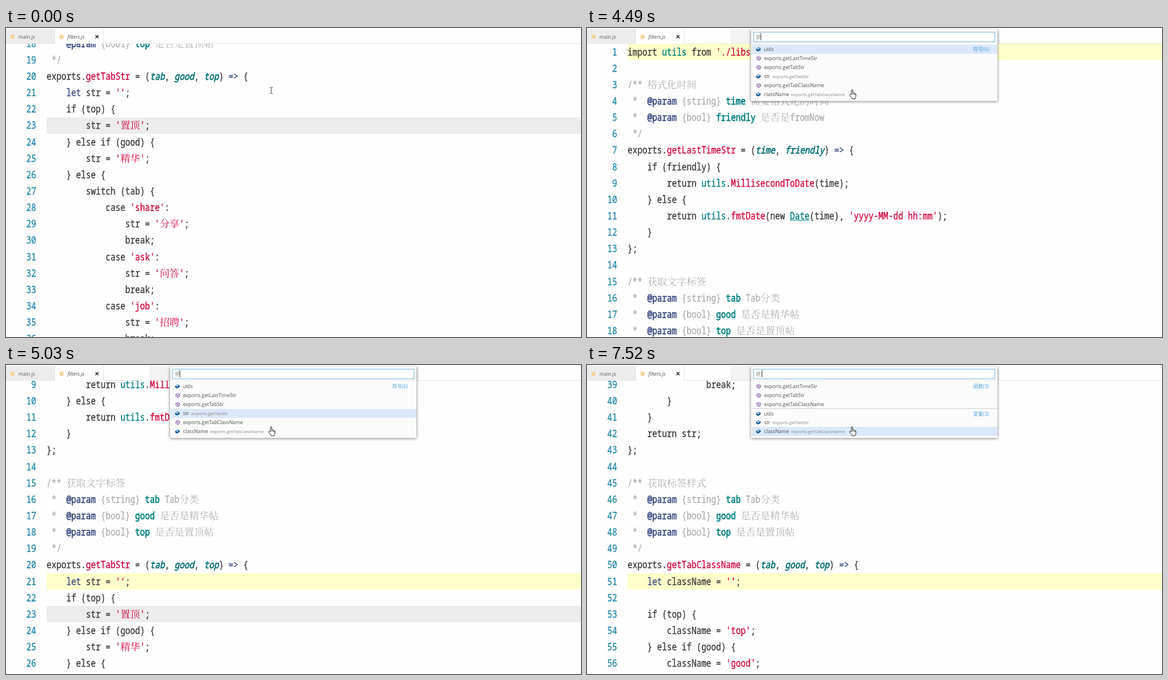
Write an HTML page with a canvas that moves like this. It is 1020x549 px and loops after 8 s.

```html
<!DOCTYPE html>
<html lang="zh">
<head>
<meta charset="utf-8">
<title>Go to symbol</title>
<style>
html, body { margin: 0; width: 100%; height: 100%; overflow: hidden; background: #fefefe; }
canvas { display: block; }
</style>
</head>
<body>
<canvas width="1020" height="549"></canvas>
<script>
const ctx = document.querySelector('canvas').getContext('2d');
const LOOP = 8000;
const LINE = 29.15, SIZE = 17.45, COLUMN = SIZE / 2, LEFT = 72;
const ANCHOR = 369.8, FIRST_TOP = 27.7;
const MONO = `500 ${SIZE}px "Noto Sans Mono", "DejaVu Sans Mono", monospace`;
const CJK = `300 ${SIZE}px "Noto Serif CJK SC", "Noto Sans CJK SC", serif`;
const ui = (size, style = '') => `${style} ${size}px "Open Sans", "Noto Sans", "Noto Sans CJK SC", sans-serif`;

const COLORS = {
  plain: '#3c3c3c', comment: '#b0b0b0', string: '#d2083f', call: '#d2083f',
  param: '#087374', name: '#008080', key: '#3f4f85'
};
// Outline added to the letters of the code font
const MEDIUM = .4, HEAVY = .75;
const DOC = /(?<key>@param)|(?<name>(?<=\} )\w+)/g;
const CODE = /(?<string>'[^']*')|(?<param>(?<=[(,] ?)\w+(?=.*=>))|(?<call>(?<=\.)\w+)|(?<name>\b(?:utils|Date)\b)|(?<key>\blet\b|=>)/g;

const source = `import utils from './libs/utils';

/** 格式化时间
 *  @param {string} time 需要格式化的时间
 *  @param {bool} friendly 是否是fromNow
 */
exports.getLastTimeStr = (time, friendly) => {
    if (friendly) {
        return utils.MillisecondToDate(time);
    } else {
        return utils.fmtDate(new Date(time), 'yyyy-MM-dd hh:mm');
    }
};

/** 获取文字标签
 *  @param {string} tab Tab分类
 *  @param {bool} good 是否是精华帖
 *  @param {bool} top 是否是置顶帖
 */
exports.getTabStr = (tab, good, top) => {
    let str = '';
    if (top) {
        str = '置顶';
    } else if (good) {
        str = '精华';
    } else {
        switch (tab) {
            case 'share':
                str = '分享';
                break;
            case 'ask':
                str = '问答';
                break;
            case 'job':
                str = '招聘';
                break;
            default:
                str = '暂无';
                break;
        }
    }
    return str;
};

/** 获取标签样式
 *  @param {string} tab Tab分类
 *  @param {bool} good 是否是精华帖
 *  @param {bool} top 是否是置顶帖
 */
exports.getTabClassName = (tab, good, top) => {
    let className = '';

    if (top) {
        className = 'top';
    } else if (good) {
        className = 'good';
    }`;

function tokenize(line) {
  const isDoc = /^(\/\*| \*)/.test(line), base = isDoc ? 'comment' : 'plain';
  const tokens = [];
  let end = 0;
  for (const match of line.matchAll(isDoc ? DOC : CODE)) {
    const kind = Object.keys(match.groups).find(k => match.groups[k]);
    tokens.push({ word: line.slice(end, match.index), kind: base, outline: MEDIUM });
    tokens.push({ word: match[0], kind, outline: isDoc || kind === 'param' ? HEAVY : MEDIUM });
    end = match.index + match[0].length;
  }
  tokens.push({ word: line.slice(end), kind: base, outline: MEDIUM });
  return tokens;
}
const lines = source.split('\n').map(tokenize);

// Symbols: [name, container]
const utils = ['utils'], lastTime = ['exports.getLastTimeStr'], tabStr = ['exports.getTabStr'],
  tabClass = ['exports.getTabClassName'], str = ['str', tabStr[0]], className = ['className', tabClass[0]];
const byPosition = [utils, lastTime, tabStr, str, tabClass, className];
const byKind = [lastTime, tabStr, tabClass, utils, str, className];

// view: line shown at ANCHOR; from/to: highlighted lines; row: selected symbol
const SCENES = [
  { at: 0, view: 30.245 },
  { at: 1800, view: 30.245, panel: true },
  { at: 4400, view: 1, from: 1, to: 1, row: 0, panel: true },
  { at: 4610, view: 7, from: 7, to: 13, row: 1, panel: true },
  { at: 4790, view: 20, from: 20, to: 43, row: 2, panel: true },
  { at: 4940, view: 21, from: 21, to: 21, row: 3, panel: true },
  { at: 5150, view: 50, from: 50, to: 70, row: 4, panel: true },
  { at: 5300, view: 51, from: 51, to: 51, row: 5, panel: true },
  { at: 6560, view: 51, from: 51, to: 51, row: 5, panel: true, grouped: true }
];
const EDITOR_CARET_ON = [[500, 1000], [1490, 1800]];
const INPUT_CARET_OFF = [[2820, 3310], [3900, 4400], [5790, 6260], [7020, 7520]];
const within = (spans, t) => spans.some(([a, b]) => t >= a && t < b);

ctx.font = MONO;
const condense = COLUMN / ctx.measureText('0').width;

function rect(x, y, w, h, color) {
  ctx.fillStyle = color;
  ctx.fillRect(x, y, w, h);
}

function text(string, x, y, font, color) {
  ctx.font = font;
  ctx.fillStyle = color;
  ctx.fillText(string, x, y);
}

function codeText(string, x, y, color, outline, style = '') {
  at(x, y, () => {
    ctx.scale(condense, 1);
    text(string, 0, 0, style + MONO, color);
    ctx.strokeStyle = color;
    ctx.lineWidth = outline;
    ctx.lineJoin = 'round';
    ctx.strokeText(string, 0, 0);
  });
}

function path(d, fill, stroke, width = 1) {
  const shape = new Path2D(d);
  if (fill) { ctx.fillStyle = fill; ctx.fill(shape); }
  if (stroke) { ctx.strokeStyle = stroke; ctx.lineWidth = width; ctx.stroke(shape); }
}

function at(x, y, drawShape) {
  ctx.save();
  ctx.translate(x, y);
  drawShape();
  ctx.restore();
}

function drawLine(tokens, top) {
  let column = 0;
  const baseline = top + 20.8;
  for (const { word, kind, outline } of tokens) {
    for (const run of word.match(/[\u3400-\u9fff]+|[^\u3400-\u9fff]+/g) || []) {
      const isCjk = run.charCodeAt(0) > 0x33ff, x = LEFT + column * COLUMN;
      if (isCjk) text(run, x, baseline, CJK, COLORS[kind]);
      else codeText(run, x, baseline, COLORS[kind], outline, kind === 'param' ? 'italic ' : '');
      if (run === 'Date') rect(x, Math.round(top + 22), 4 * COLUMN, 1, COLORS.name);
      column += run.length * (isCjk ? 2 : 1);
    }
  }
}

function drawEditor(scene, t) {
  const firstTop = Math.min(FIRST_TOP, ANCHOR - (scene.view - 1) * LINE);
  const topOf = number => firstTop + (number - 1) * LINE;
  const band = (from, to, color) => {
    const y = Math.round(topOf(from));
    rect(LEFT, y, 1020 - LEFT, Math.round(topOf(to + 1)) - y, color);
  };
  if (scene.from) band(scene.from, scene.to, '#ffffcb');
  band(23, 23, 'rgba(0,0,0,.07)');
  lines.forEach((tokens, i) => {
    const top = topOf(i + 1), label = String(i + 1);
    if (top < -LINE || top > 549) return;
    codeText(label, 36 + (2 - label.length) * COLUMN, top + 20.8, '#2489ab', MEDIUM);
    drawLine(tokens, top);
  });
  if (within(EDITOR_CARET_ON, t)) rect(255, 159, 2, 29, '#222');
}

function drawTabs() {
  rect(0, 0, 1020, 28, '#fefefe');
  rect(0, 2, 86, 25, '#ececec');
  rect(0, 27, 87, 1, '#e6e6e6');
  rect(172, 27, 848, 1, '#e6e6e6');
  rect(86, 2, 1, 25, '#e4e4e4');
  rect(172, 2, 1, 25, '#e2e2e2');
  rect(8, 12, 7, 7, '#f3d49c');
  rect(95, 12, 7, 7, '#f3d49c');
  text('main.js', 22, 18.5, ui(8.8), '#5c5c5c');
  text('filters.js', 109, 18.5, ui(8.8, 'italic'), '#4c4c4c');
  path('M158.7 12.7l5.4 5.4m0-5.4l-5.4 5.4', null, '#333', 1.6);
}

function drawSymbol([name, container], y) {
  const isVariable = container || name === 'utils';
  at(304, y, () => {
    if (isVariable) {
      path('M-4 -.5L.5 -3.5L4 -1.8V1L-.5 3.7L-4 2Z', '#145a9c');
      path('M-2.6 -.4L.6 -2.3L2.6 -1.4L-.5 .5Z', '#e4eef8');
    } else {
      path('M.7 -3.5L4 -1.8V1.8L.7 3.6L-2.6 1.8V-1.8ZM-2.6 -1.8L.7 0L4 -1.8M.7 0V3.6', null, '#7a4a9e', 1);
    }
  });
  text(name, 314, y + 3.2, ui(8.8), '#505050');
  if (container) text(container, name === 'str' ? 329 : 362, y + 3.2, ui(7.9), '#888');
}

function drawPanel(scene, t) {
  rect(255, 2, 477, 25, '#f3f3f3');
  ctx.save();
  ctx.shadowColor = 'rgba(0,0,0,.55)';
  ctx.shadowBlur = 5;
  ctx.shadowOffsetY = 1.5;
  rect(291, 2, 437, 127.5, '#f5f5f5');
  ctx.restore();
  rect(291, 30, 437, 99.5, '#fbfbfb');

  rect(295, 7, 429, 18, '#7cbbdf');
  rect(296, 8, 427, 16, '#fff');
  text(scene.grouped ? '@:' : '@', 300, 19, ui(8.8), '#666');
  if (!within(INPUT_CARET_OFF, t)) rect(scene.grouped ? 310 : 308, 9, 1, 13, '#333');

  if (scene.row !== undefined) rect(292, 30 + scene.row * 16, 436, 16, '#dae8f9');
  (scene.grouped ? byKind : byPosition).forEach((symbol, i) => {
    drawSymbol(symbol, 38 + i * 16 + (scene.grouped && i === 3 ? .7 : 0));
  });
  const badge = (label, y) => text(label, 685, y + 3.3, ui(8.8), '#4fa3e0');
  badge(scene.grouped ? '函数(3)' : '符号(6)', 38);
  if (scene.grouped) {
    rect(292, 77, 436, 1, '#cfcfcf');
    badge('变量(3)', 86.7);
  }
}

function drawPointer(isHand) {
  if (isHand) {
    at(465, 109, () => {
      path('M4 10V2Q4 .6 5.2 .6T6.4 2V6.3Q8 5.6 8.7 6.8Q10 6.4 10.6 7.5Q12 7.3 12 8.8V12Q12 14 10.6 15.4V16.8H5.2V15.5L1 10.8Q.2 9.4 1.4 8.9T4 10Z',
        '#fff', '#222', 1);
      path('M6.4 6.3V9.5M8.7 7V9.7M10.6 7.8V10', null, '#222', .8);
    });
  } else {
    path('M468 105.5h2m1 0h2M470.5 106v10M468 116.5h2m1 0h2', null, '#444', 1);
  }
}

function draw(t) {
  const scene = SCENES.findLast(s => t >= s.at);
  rect(0, 0, 1020, 549, '#fefefe');
  drawEditor(scene, t);
  drawTabs();
  if (scene.panel) drawPanel(scene, t);
  drawPointer(scene.panel);
}

const start = performance.now();
function tick() {
  draw((performance.now() - start) % LOOP);
  requestAnimationFrame(tick);
}
tick();
</script>
</body>
</html>
```
